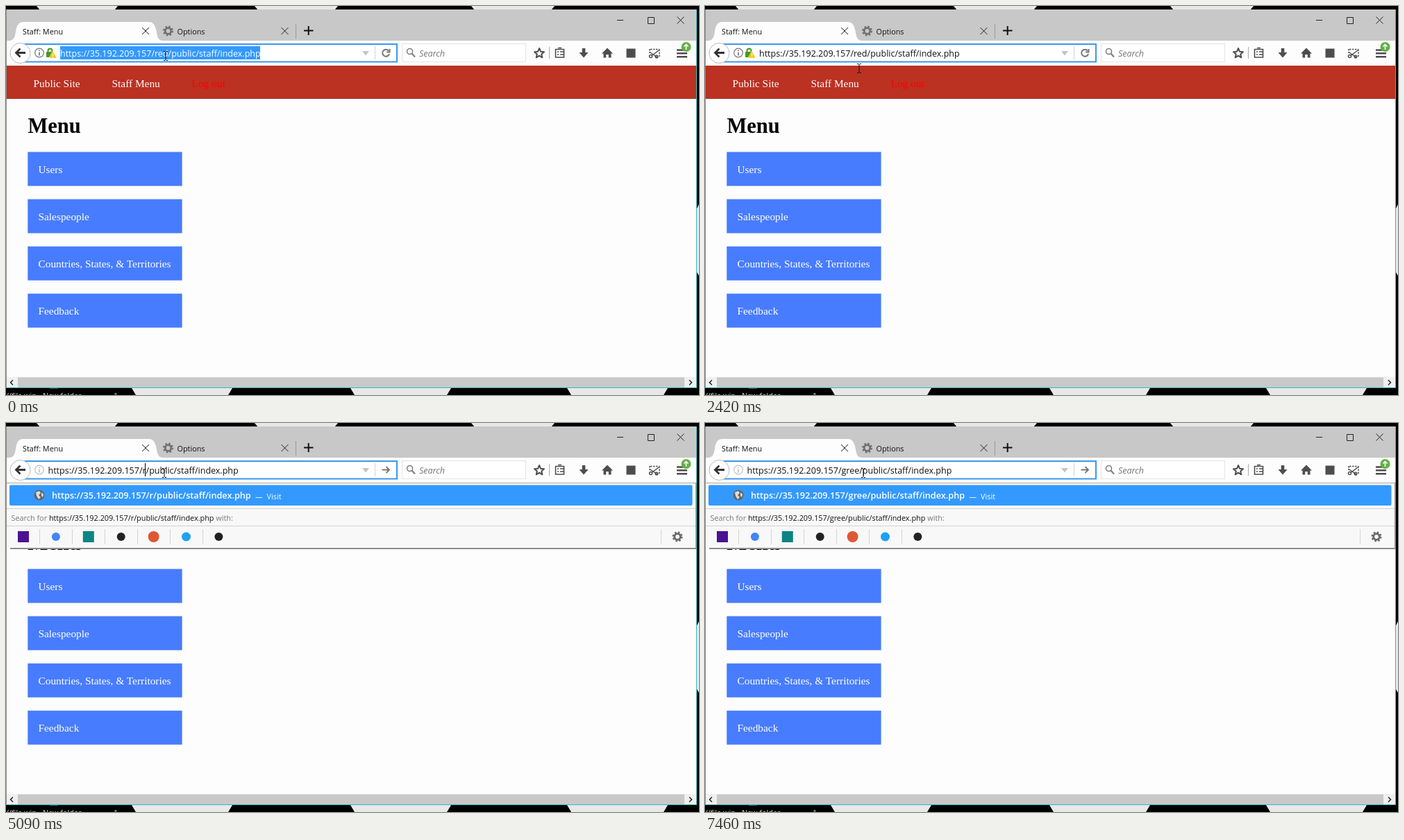
An HTML page that plays this animation: 998x561 px, repeating every 7.99 s.

```html
<!DOCTYPE html>
<html lang="en">
<head>
<meta charset="utf-8">
<title>Editing an address</title>
<style>
  html, body { margin: 0; width: 100%; height: 100%; overflow: hidden; background: #000; }
  svg { display: block; width: 998px; height: 561px; }
  text { font: 10.85px "Open Sans", "Noto Sans", sans-serif; fill: #111; }
  .url { font-size: 12.52px; }
  .bold { font-size: 12.7px; font-weight: 600; }
  .hint { font-style: italic; fill: #777; }
  .page text { font: 15.37px "Liberation Serif", "Times New Roman", serif; fill: #fff; }
  .page .title { font-size: 30.5px; font-weight: bold; fill: #000; }
  .desk { fill: #ddd; }
  .line { fill: none; stroke: #4d4d4d; stroke-width: 2; }
  .thin { fill: none; stroke: #222; stroke-width: 1; }
  .rule { fill: none; stroke: #d2d2d2; stroke-width: 1; }
  .dark { fill: #4d4d4d; }
</style>
</head>
<body>
<svg viewBox="0 0 998 561">
  <defs>
    <path id="cross" class="thin" d="M-5-5 5 5M5-5-5 5"/>
    <g id="gear" fill="none">
      <circle r="4.3" stroke-width="2.8"/>
      <circle r="6.4" stroke-width="2.2" stroke-dasharray="2.5 2.526"/>
    </g>
  </defs>

  <!-- desktop -->
  <rect width="998" height="561"/>
  <path fill="#e8e8e8" d="M44 0H161L156 6H49ZM358 0H478L473 6H363ZM670 0H790L785 6H675ZM181 551H326L320 561H187ZM496 551H641L635 561H502ZM808 551H953L947 561H814ZM998 286 995 292V384L998 389Z"/>
  <text class="desk" x="0" y="566">//file.win</text>
  <text class="desk" x="53" y="566">New folder</text>
  <text class="desk" x="155" y="566">1</text>
  <path d="M63 551H75" stroke="#999"/>

  <!-- window -->
  <rect y="5" width="995" height="546" fill="#2bbcbf"/>
  <rect y="5" width="1" height="545" fill="#888"/>
  <rect x="1" y="5" width="993" height="545" fill="#fdfdfd"/>
  <rect x="1" y="5" width="993" height="45" fill="#c8c8c8"/>
  <path class="thin" d="M880 20.5H889M924.5 16.5H933.5V25.5H924.5Z"/>
  <use href="#cross" x="971.5" y="20.5"/>
  <path fill="#fdfdfd" d="M5 50C14 49 13 40 15 32Q17 23 25 23H206Q213 23 215.500 32C218 40 217 49 225 50Z"/>
  <text x="24" y="41">Staff: Menu</text>
  <use href="#cross" x="201" y="36"/>
  <use href="#gear" x="233.5" y="36" stroke="#707070"/>
  <text x="246.5" y="41">Options</text>
  <use href="#cross" x="401.5" y="36"/>
  <path d="M417.5 26V47" stroke="#999"/>
  <path d="M429 35.5H442.500M435.700 29V42" stroke="#111" stroke-width="2"/>

  <!-- toolbar -->
  <rect x="21" y="55" width="542" height="25.500" fill="#fff" stroke="#3b97ee" stroke-width="2"/>
  <circle cx="20.500" cy="68" r="14.500" fill="#fff" stroke="#bbb"/>
  <path d="M28 67.500H15M20.500 61.500 14.500 67.500 20.500 73.500" fill="none" stroke="#333" stroke-width="2.800"/>
  <g id="info" fill="none" stroke="#777" stroke-width="1.200">
    <circle cx="48" cy="67.500" r="6.300"/>
    <path d="M48 66.500V71.500M48 63.500V65" stroke-width="1.700"/>
  </g>
  <g id="lock">
    <path d="M60.500 67V64.500a3 3 0 0 1 6 0V67" fill="none" stroke="#4a9a1e" stroke-width="2"/>
    <rect x="58" y="66" width="10" height="8" rx="1" fill="#4a9a1e"/>
    <path d="M67.500 65 73 75H62Z" fill="#ffc20e" stroke="#fff" stroke-width=".5"/>
    <path d="M67.500 68.500V72M67.500 73V74" stroke="#fff" stroke-width="1.200"/>
  </g>
  <rect id="selection" x="78" y="58" width="288" height="19" fill="#3399ff"/>
  <text id="address" class="url" y="73"></text>
  <path d="M513 65H523L518 71.500Z" fill="#c4c4c4"/>
  <path class="rule" d="M531.500 58V77"/>
  <path id="reload" d="M551 64.500A5 5 0 1 0 552 69M552.500 62V66.500H548" fill="none" stroke="#777" stroke-width="2"/>
  <path id="go" d="M541.500 67.500H552M547.500 63 552 67.500 547.500 72" fill="none" stroke="#777" stroke-width="1.800"/>
  <rect x="570.500" y="54.500" width="178" height="26" fill="#fff" stroke="#e4e4e4"/>
  <g fill="none" stroke="#808080"><circle cx="581.500" cy="65.500" r="4" stroke-width="1.600"/><path d="M584.500 68.500 589 73.500" stroke-width="2.200"/></g>
  <text class="url hint" x="595" y="73">Search</text>
  <path class="line" stroke-linejoin="round" d="M768 61 770 65.700 775 66.200 771.200 69.500 772.300 74.300 768 71.700 763.700 74.300 764.800 69.500 761 66.200 766 65.700Z"/>
  <path class="rule" d="M782.500 59V76" style="stroke:#aaa"/>
  <path class="line" style="stroke-width:1.600" d="M791.500 62.500H803.500V74H791.500ZM794 66H796M798 66H803M794 70H796M798 70H803M795 60.500H800"/>
  <path class="dark" d="M829.700 61H834.300V67H838.500L832 74.500 825.500 67H829.700Z"/>
  <path class="dark" d="M866 60.500 874 68.500H871.500V74.500H867.800V70H864.200V74.500H860.500V68.500H858Z"/>
  <rect class="dark" x="893.500" y="61.500" width="13" height="13"/>
  <g class="line" style="stroke-width:1.500"><path d="M928 62.500H941M941 62.500V74M927 62V68" stroke-dasharray="2.500 1.500"/><path d="M940 64 930 71.500M927 66.500 938 74"/><circle cx="928.500" cy="72.500" r="2"/><circle cx="937" cy="73" r="1.800"/></g>
  <path d="M966 63.500H981M966 68.300H981M966 73.200H981" stroke="#4d4d4d" stroke-width="2.600"/>
  <circle cx="979.500" cy="59" r="7" fill="#62b146"/>
  <path d="M979.500 63V56M976.500 58.500 979.500 55.500 982.500 58.500" fill="none" stroke="#fff" stroke-width="1.600"/>

  <!-- web page -->
  <g class="page">
    <rect x="1" y="86" width="993" height="48" fill="#bb3122"/>
    <path d="M1 133.500H994" stroke="#a0452f"/>
    <text x="39.500" y="117">Public Site</text>
    <text x="152.500" y="117">Staff Menu</text>
    <text x="267.500" y="117" style="fill:#f00">Log out</text>
    <text class="title" x="31.500" y="182.500">Menu</text>
    <g id="buttons"></g>
  </g>
  <rect x="1" y="535" width="993" height="15" fill="#f0f0f0"/>
  <rect x="17" y="535.500" width="960" height="14.500" fill="#c9c9c9"/>
  <path class="thin" style="stroke-width:1.500" d="M10 539.500 6.500 543 10 546.500M984 539.500 987.500 543 984 546.500"/>

  <!-- suggestions -->
  <path id="shadow" d="M6 181H993V86" fill="none" stroke="#8c8c8c" stroke-width="2"/>
  <g id="panel">
    <rect x="1" y="86" width="992" height="94" fill="#f8f8f8"/>
    <path d="M1 86.500H993" stroke="#aaa"/>
    <rect x="5" y="89.500" width="983.500" height="29.500" rx="2" fill="#3399ff"/>
    <circle cx="48" cy="104" r="7.500" fill="#666"/>
    <path d="M43 100 48 98 50 101 47 104 50 107 47 110 44 105ZM51 100 54 103 53 107 51 105Z" fill="#ddd"/>
    <text y="109" x="66" style="fill:#fff"><tspan id="visit" class="bold"></tspan><tspan dx="6" dy="1">—</tspan><tspan dx="6">Visit</tspan></text>
    <path class="rule" d="M1 123.500H993M1 148.500H993M943.500 153V175"/>
    <text x="7.500" y="141" style="fill:#777">Search for <tspan id="query" fill="#111"></tspan> with:</text>
    <g id="engines"></g>
    <use href="#gear" x="967" y="164" stroke="#666"/>
  </g>

  <rect id="caret" y="58" width="1" height="19"/>
  <path id="mouse" d="M-3-6.500H-1L0-5.500 1-6.500H3M0-5.500V5.500M-3 6.500H-1L0 5.500 1 6.500H3" fill="none" stroke="#111"/>
</svg>
<script>
const LOOP = 7990;
const el = id => document.getElementById(id);
const show = (id, on) => el(id).style.display = on ? '' : 'none';
const url = dir => `https://35.192.209.157/${dir}/public/staff/index.php`;

el('buttons').innerHTML = ['Users', 'Salespeople', 'Countries, States, &amp; Territories', 'Feedback']
  .map((label, i) => `<g transform="translate(31.3 ${210.5 + i * 68.1})">
    <rect width="222.300" height="49" fill="#487cff"/><text x="15.200" y="30.500">${label}</text></g>`).join('');

// Plain dots and squares stand for the search engines.
el('engines').innerHTML = [['#4b1291', 8, 1], ['#4285f4', 6], ['#0c8484', 8, 1], ['#222', 6],
  ['#de5833', 8], ['#1da1f2', 6.5], ['#222', 6]].map(([color, r, square], i) => {
    const x = 25 + i * 46.9;
    return `<rect x="${x - r}" y="${164 - r}" width="${2 * r}" height="${2 * r}" rx="${square ? 0 : r}" fill="${color}"/>` +
      (i < 6 ? `<path class="rule" d="M${Math.round(48 + i * 47) + .5} 153V175"/>` : '');
  }).join('');

// Each step changes part of the state from its time on.
const steps = [
  [0, { dir: 'red', selected: true, mouse: [230, 72], caret: 0, shadow: false, hint: null }],
  [930, { mouse: [217, 72] }],
  [2160, { selected: false }],
  [2290, { mouse: [219, 82] }],
  [2420, { mouse: [222, 90] }],
  [2680, { mouse: [220, 72], caret: 217 }],
  [2950, { mouse: [224, 72] }],
  [3080, { mouse: [228, 72] }],
  [3240, { caret: 0 }],
  [3770, { caret: 224 }],
  [4170, { caret: 0 }],
  [4290, { caret: 232 }],
  [4820, { dir: 're', caret: 207 }],
  [4940, { shadow: true }],
  [5090, { dir: 'r', caret: 200, hint: 'r' }],
  [5340, { caret: 0 }],
  [5750, { dir: '', caret: 195 }],
  [5870, { hint: '' }],
  [6420, { dir: 'g', caret: 202 }],
  [6550, { hint: 'g' }],
  [6810, { caret: 0 }],
  [6940, { dir: 'gr' }],
  [7070, { dir: 'gre', hint: 'gre' }],
  [7330, { dir: 'gree' }],
  [7460, { hint: 'gree' }]
];

function draw(now) {
  const t = now % LOOP;
  const s = Object.assign({}, ...steps.filter(([at]) => at <= t).map(step => step[1]));
  const edited = s.dir !== 'red', open = s.hint !== null;
  const address = el('address');
  address.textContent = url(s.dir);
  address.setAttribute('x', edited ? 60.5 : 78);
  address.style.fill = s.selected ? '#fff' : '#111';
  show('selection', s.selected);
  show('lock', !edited);
  show('reload', !edited);
  show('go', edited);
  el('info').style.opacity = edited ? .45 : 1;
  show('shadow', s.shadow);
  show('panel', open);
  if (open) el('visit').textContent = el('query').textContent = url(s.hint);
  show('caret', s.caret);
  el('caret').setAttribute('x', s.caret);
  el('mouse').setAttribute('transform', `translate(${s.mouse})`);
  requestAnimationFrame(draw);
}
requestAnimationFrame(draw);
</script>
</body>
</html>
```
